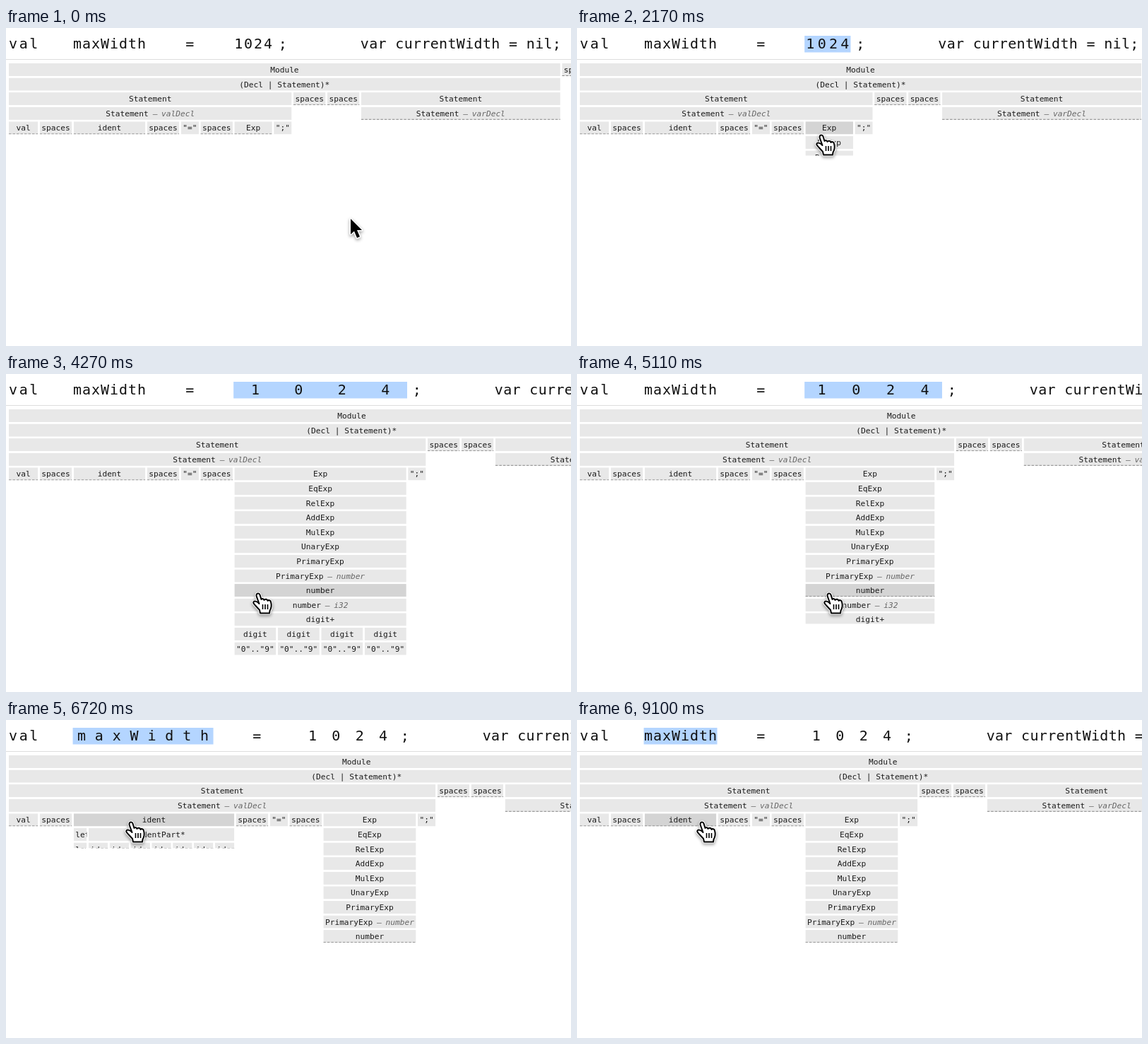
Write an HTML page with a canvas that moves like this. It is 800 px wide and 450 px high and loops after 9660 ms.

```html
<!DOCTYPE html>
<html lang="en">
<head>
<meta charset="utf-8">
<title>Parse tree</title>
<style>
  html, body { margin: 0; width: 100%; height: 100%; overflow: hidden; background: #fff; }
  canvas { display: block; }
</style>
</head>
<body>
<canvas id="stage" width="800" height="450"></canvas>
<script>
const ctx = document.getElementById('stage').getContext('2d');
const FONT = '"DejaVu Sans Mono", monospace';
const LOOP = 9660, STEP = 70, TOGGLE_TIME = 400, TEXT_LAG = 22;
const TOP = 49.9, PITCH = 20.6, BOX = 18.2, GAP = 2.4, LEFT = 2.8;
const CHAR = 6.745, DASH_WIDTH = 18.2;

// Alternating open / close times of the expandable nodes
const toggles = { exp: [2061], num: [3770, 4900], id: [6575, 8240] };
const clicks = [1850, 3640, 4760, 6420, 8100];
// time, x, y of the pointer's hot spot
const path = [
  [560, 481, 264], [1600, 338, 144], [2520, 338, 144], [3430, 349, 303],
  [5300, 349, 303], [5860, 180, 137], [5950, 180, 137], [6230, 169, 137]
];

const smooth = u => { u = Math.min(1, Math.max(0, u)); return u * u * (3 - 2 * u); };
const amount = (key, t) => toggles[key].reduce((p, start, i) => {
  const s = smooth((t - start) / TOGGLE_TIME);
  return i % 2 ? p * (1 - s) : s;
}, 0);
const isOpen = (key, t) => toggles[key].filter(start => start <= t).length % 2 === 1;

// Labels are "rule" or "rule|case"
const labelWidth = label =>
  label.replace('|', '').length * CHAR + (label.includes('|') ? DASH_WIDTH : 0);
const slotWidth = label => labelWidth(label) + 7.5;
const textSlot = text => text.length * 12.03 + 7.7;

const node = (label, kids = [], extra = {}) => ({ label, kids, ...extra });
const chain = (labels, kids = []) =>
  labels.split(' ').reduceRight((inner, label) => [node(label, inner)], kids);
const sum = list => list.reduce((a, b) => a + b, 0);
const natural = n => Math.max(slotWidth(n.label), sum(n.kids.map(natural)));

const digits = [0, 1, 2, 3].flatMap(() => chain('digit "0".."9"'));
const number = node('number', chain('number|i32 digit+', digits), { key: 'num', rows: 4 });
const parts = [...'axWidth'].flatMap(c =>
  chain('identPart alnum letter ' + (c < 'a' ? 'upper' : 'lower')));
const exp = node('Exp', chain('EqExp RelExp AddExp MulExp UnaryExp PrimaryExp PrimaryExp|number', [number]),
  { key: 'exp', rows: 8 });
const ident = node('ident', [...chain('letter lower'), node('identPart*', parts)], { key: 'id', rows: 5 });
const closed = label => node(label, [], { closed: true });
const spaces = closed('spaces');

// Each piece of code with the tree node below it
const tokens = [
  ['val', closed('val')], ['', spaces], ['maxWidth', ident], ['', spaces], ['=', node('"="')],
  ['', spaces], ['1024', exp], [';', node('";"')], ['', spaces], ['', spaces],
  ['var currentWidth = nil;', closed('Statement|varDecl')], ['', spaces]
];
const STMT_END = 8, VAR = 10, LAST = 11;

function slots(t) {
  const expOpen = slotWidth('PrimaryExp|number'), numOpen = 4 * slotWidth('"0".."9"');
  const idOpen = sum(ident.kids.map(natural));
  let x = LEFT;
  return tokens.map(([text, n]) => {
    let w = Math.max(slotWidth(n.label), text ? textSlot(text) : 0);
    if (n === ident) w += (idOpen - w) * amount('id', t);
    if (n === exp) w += (expOpen - w) * amount('exp', t) + (numOpen - expOpen) * amount('num', t);
    const slot = { x, w };
    x += w;
    return slot;
  });
}

let now, pointer, hovered;

function drawBox(label, x, w, row, dashed) {
  const y = TOP + row * PITCH, left = x + GAP / 2, width = w - GAP;
  if (width <= 0) return;
  const over = pointer.x >= left && pointer.x < left + width && pointer.y >= y && pointer.y < y + BOX;
  hovered = hovered || over;
  ctx.save();
  ctx.beginPath();
  ctx.rect(left, y, width, BOX);
  ctx.clip();
  ctx.fillStyle = over ? '#d4d4d4' : '#e8e8e8';
  ctx.fillRect(left, y, width, BOX);
  const [rule, variant] = label.split('|');
  let textX = left + Math.max(2.5, (width - labelWidth(label)) / 2);
  ctx.font = '11.2px ' + FONT;
  ctx.fillStyle = '#1a1a1a';
  ctx.fillText(rule, textX, y + 13);
  if (variant) {
    textX += rule.length * CHAR;
    ctx.fillStyle = '#666';
    ctx.fillText('—', textX + (DASH_WIDTH - CHAR) / 2, y + 13);
    ctx.font = 'italic 11.2px ' + FONT;
    ctx.fillText(variant, textX + DASH_WIDTH, y + 13);
  }
  if (dashed) {
    ctx.strokeStyle = '#888';
    ctx.setLineDash([3.5, 2]);
    ctx.beginPath();
    ctx.moveTo(left, y + BOX - 0.6);
    ctx.lineTo(left + width, y + BOX - 0.6);
    ctx.stroke();
  }
  ctx.restore();
}

function drawNode(n, x, w, row) {
  const open = n.key ? amount(n.key, now) : 1;
  drawBox(n.label, x, w, row, n.closed || (n.key && !isOpen(n.key, now)));
  if (!open || !n.kids.length) return;
  ctx.save();
  if (open < 1) {
    ctx.beginPath();
    ctx.rect(x, TOP + row * PITCH + BOX, w, n.rows * PITCH * open);
    ctx.clip();
  }
  const total = sum(n.kids.map(natural));
  for (const kid of n.kids) {
    const kidWidth = w * natural(kid) / total;
    drawNode(kid, x, kidWidth, row + 1);
    x += kidWidth;
  }
  ctx.restore();
}

// Returns the index of the token under the pointer, or -1
function drawTree() {
  const s = slots(now);
  const span = (label, end, row) => drawBox(label, LEFT, s[end].x - LEFT, row);
  span('Module', LAST, 0);
  span('(Decl | Statement)*'.replace('|', '\u2223'), LAST, 1);
  span('Statement', STMT_END, 2);
  span('Statement|valDecl', STMT_END, 3);
  drawBox('Statement', s[VAR].x, s[VAR].w, 2);
  let active = -1;
  tokens.forEach(([, n], i) => {
    const row = i < STMT_END ? 4 : i === VAR ? 3 : i === LAST ? 0 : 2;
    hovered = false;
    drawNode(n, s[i].x, s[i].w, row);
    if (hovered) active = i;
  });
  return active;
}

function drawText(active) {
  ctx.fillStyle = '#ddd';
  ctx.fillRect(0, 44, 800, 1);
  ctx.font = '20px ' + FONT;
  ctx.textAlign = 'center';
  slots(now - TEXT_LAG).forEach(({ x, w }, i) => {
    const text = tokens[i][0], pitch = w / text.length;
    if (i === active) {
      ctx.fillStyle = '#b4d5ff';
      ctx.fillRect(x, 11, w, 23.5);
    }
    ctx.fillStyle = '#111';
    [...text].forEach((c, k) => ctx.fillText(c, x + (k + 0.5) * pitch, 29));
  });
  ctx.textAlign = 'left';
}

const arrow = new Path2D('M0 0V22L5 17.5L9 27L13 25.3L9 16H16Z');
const hand = new Path2D('M9 1.5C6.5 1.5 6 4 7 6.5L10.5 16C8 13 4 11.5 2.5 13.5C1.5 15 3 16.5 5 18.5' +
  'L11 25L12 29.5H25L25.5 26C28 22 28 17 27 13.5C26.5 11 23.5 10.5 22.5 12C22 9.5 19 9 17.5 11' +
  'C17 9 14.5 8.5 13.5 10L11.5 3.5C11 2 10 1.5 9 1.5Z');
const fingers = new Path2D('M15.5 17v7M19 17v7M22.5 17v7');

function drawPointer(isHand) {
  const shape = isHand ? hand : arrow;
  ctx.save();
  ctx.translate(pointer.x + (isHand ? -1 : 7), pointer.y + 6);
  ctx.lineJoin = 'round';
  ctx.save();
  ctx.shadowColor = 'rgba(0,0,0,.4)';
  ctx.shadowBlur = 4;
  ctx.shadowOffsetY = 2;
  ctx.strokeStyle = '#fff';
  ctx.lineWidth = isHand ? 4 : 3;
  ctx.stroke(shape);
  ctx.restore();
  ctx.fillStyle = isHand ? '#fff' : '#000';
  ctx.fill(shape);
  if (isHand) {
    ctx.strokeStyle = '#000';
    ctx.lineWidth = 2;
    ctx.stroke(shape);
    ctx.lineWidth = 1.6;
    ctx.stroke(fingers);
  }
  ctx.restore();
}

function drawRing() {
  for (const start of clicks) {
    const u = (now - start) / 300;
    if (u < 0 || u >= 1) continue;
    ctx.save();
    ctx.globalAlpha = 1 - u ** 3;
    ctx.strokeStyle = '#74a0f0';
    ctx.lineWidth = 4;
    ctx.beginPath();
    ctx.arc(pointer.x, pointer.y, 17 + 27 * u, 0, 2 * Math.PI);
    ctx.stroke();
    ctx.restore();
  }
}

function pointerAt(t) {
  const next = path.findIndex(([time]) => time > t);
  if (next < 1) {
    const [, x, y] = next ? path[path.length - 1] : path[0];
    return { x, y };
  }
  const [t0, x0, y0] = path[next - 1], [t1, x1, y1] = path[next];
  const s = smooth((t - t0) / (t1 - t0));
  return { x: x0 + (x1 - x0) * s, y: y0 + (y1 - y0) * s };
}

function render(time) {
  now = Math.floor((time % LOOP) / STEP) * STEP;
  pointer = pointerAt(now);
  ctx.fillStyle = '#fff';
  ctx.fillRect(0, 0, 800, 450);
  const active = drawTree();
  drawText(active);
  drawRing();
  drawPointer(active >= 0);
}

const begin = performance.now();
function tick() {
  render(performance.now() - begin);
  requestAnimationFrame(tick);
}
tick();
</script>
</body>
</html>
```
